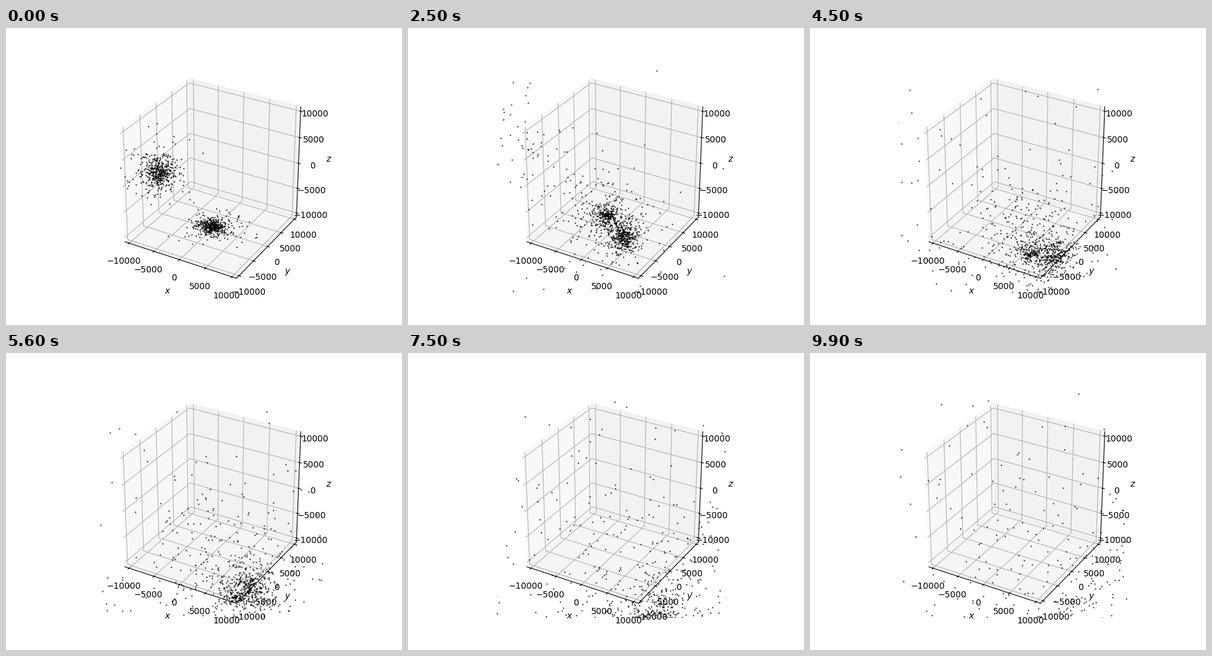
A matplotlib script that plays this animation: 640 px wide and 480 px high, repeating every 10 s.

```python
import numpy as np
import matplotlib.pyplot as plt
from matplotlib.animation import FuncAnimation

FRAMES = 100
STARS = 470            # per galaxy
UNIT = 104.3           # data units per path unit
LIMIT = 1e4 * (25 / 24) ** 2

# Screen axes of the default camera (elev 30, azim -60) in data space
RIGHT = np.array([0.866, 0.5, 0.0])
UP = np.array([-0.25, 0.433, 0.866])
TOWARD = np.cross(RIGHT, UP)

# time, right, up: centre of mass of the pair
CENTRE = np.array([
    (0, -43.5, -39.6), (13, -27, -64.6), (25, 2.5, -82.6), (45, 43, -128),
    (67, 60, -170.6), (83, 78, -215), (99, 95, -275)])

# time, right, up: offset of the first galaxy from the centre of mass
SWING = np.array([
    (0, -43.5, 44), (5, -33, 34), (9.5, 1, 2), (13, 15, -16), (19, 20, -22),
    (25, 13.5, -17), (45, 21, 0), (56, 12, 9), (67, -5, 4), (99, 0, 0)])

rng = np.random.default_rng(12)


def spline(keys, t):
    """Smooth path through keys, as points in data space."""
    times, pts = keys[:, 0], keys[:, 1:]
    slope = np.gradient(pts, times, axis=0)
    i = np.clip(np.searchsorted(times, t, side="right") - 1, 0, len(times) - 2)
    span = (times[i + 1] - times[i])[:, None]
    s = (t - times[i])[:, None] / span
    flat = ((1 + 2 * s) * (1 - s) ** 2 * pts[i]
            + s * (1 - s) ** 2 * span * slope[i]
            + s * s * (3 - 2 * s) * pts[i + 1]
            + s * s * (s - 1) * span * slope[i + 1])
    return UNIT * (flat[:, :1] * RIGHT + flat[:, 1:] * UP)


def directions(n):
    d = rng.normal(size=(n, 3))
    return d / np.linalg.norm(d, axis=1, keepdims=True)


class Galaxy:
    """A spinning disk that thickens and loses stars after the encounter."""

    def __init__(self, side, axes, burst, stream):
        n = STARS
        self.side = side
        self.e1, self.e2, self.normal = axes
        self.r = rng.lognormal(np.log(1650), 0.75, n) % 8400
        self.phase = rng.uniform(0, 2 * np.pi, n)
        self.spin = np.minimum(0.2 * (1500 / self.r) ** 1.5, 0.4)
        self.height = self.r * rng.normal(0, 0.6, n)

        self.leave = 11.5 + rng.exponential(48, n)
        speed = rng.lognormal(np.log(4), 0.65, n)
        self.leave[:burst] = rng.uniform(10, 12.5, burst)
        speed[:burst] = rng.lognormal(np.log(14), 0.9, burst)
        self.vel = speed[:, None] * directions(n) + 0.8 * RIGHT - UP
        if stream:
            part = slice(burst, burst + stream)
            self.leave[part] = rng.uniform(13, 18, stream)
            fling = rng.uniform(0.2, 1.25, (stream, 1)) * (11 * UP - 12 * RIGHT)
            self.vel[part] = fling + rng.normal(0, 3, (stream, 3))

    def at(self, t):
        bound = np.minimum(t, self.leave)
        angle = self.phase + self.spin * bound
        m = np.clip((bound - 7) / 6, 0, 1)
        puff = m * m * (3 - 2 * m)
        size = 1 - 0.35 * puff + 0.009 * bound
        local = (np.outer(self.r * np.cos(angle) * size, self.e1)
                 + np.outer(self.r * np.sin(angle) * size, self.e2)
                 + np.outer(self.height * puff * size, self.normal))
        core = spline(CENTRE, bound) + self.side * spline(SWING, bound)
        return core + local + UNIT * (t - bound)[:, None] * self.vel


galaxies = [Galaxy(1, (RIGHT, UP, TOWARD), 30, 0),
            Galaxy(-1, np.eye(3), 40, 75)]


def stars(t):
    return np.concatenate([g.at(t) for g in galaxies]).T


fig = plt.figure(figsize=(6.4, 4.8), dpi=100)
ax = fig.add_subplot(projection="3d")
dots, = ax.plot(*stars(0), "k.", markersize=1)

# Unit cube at the default camera distance
ax.set_box_aspect((1, 1, 1), zoom=3 ** 0.5 / 1.8294640721620434)
ax.set(xlim=(-LIMIT, LIMIT), ylim=(-LIMIT, LIMIT), zlim=(-LIMIT, LIMIT),
       xlabel="$x$", ylabel="$y$", zlabel="$z$")
for axis in (ax.xaxis, ax.yaxis, ax.zaxis):
    axis.set_ticks(np.arange(-10000, 10001, 5000))


def update(frame):
    dots.set_data_3d(*stars(frame))
    return dots,


anim = FuncAnimation(fig, update, frames=FRAMES, interval=100, blit=False)
plt.show()
```
